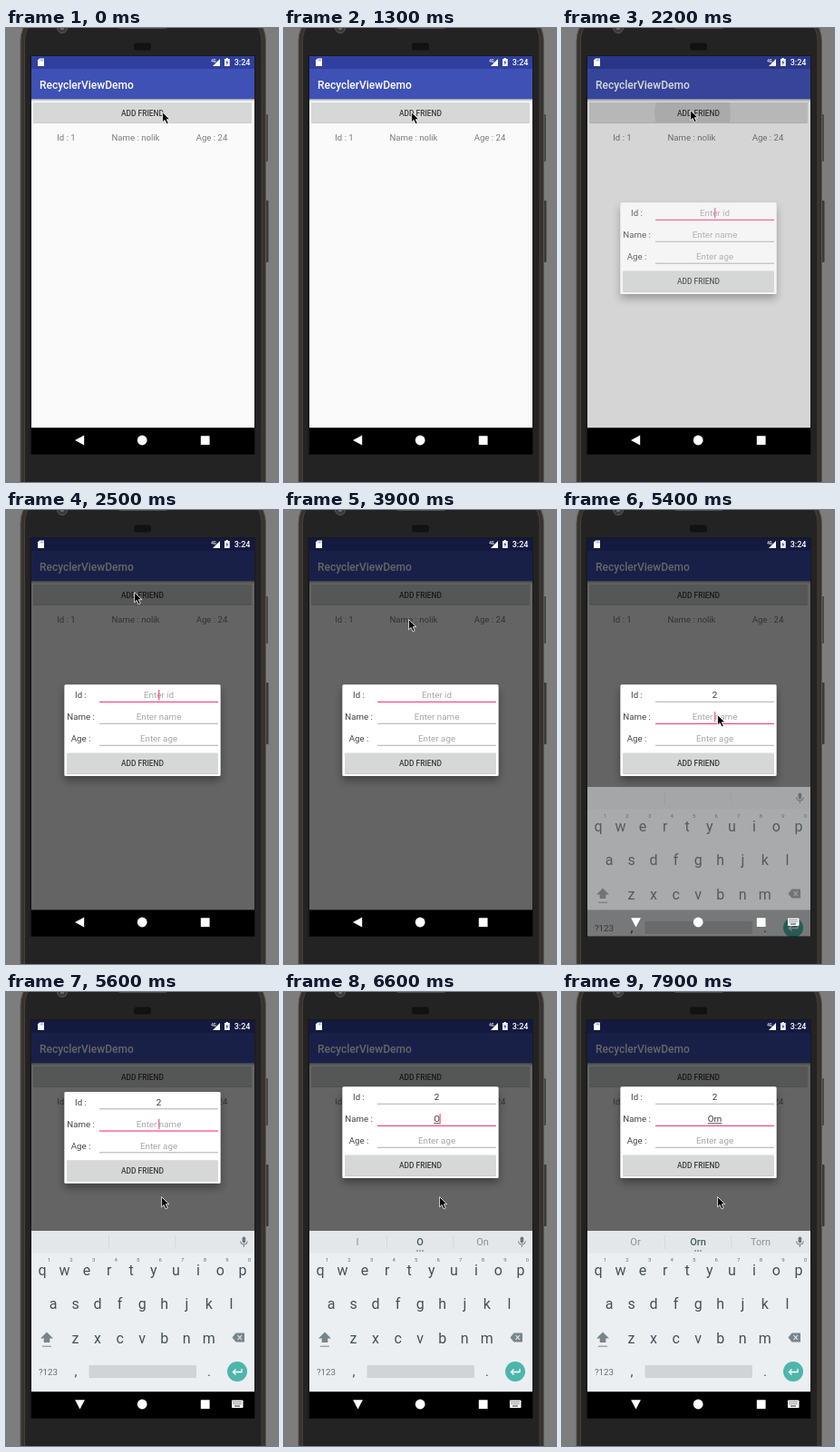
These frames come from a looping animation (300x500 px, 8000 ms). An HTML page:

```html
<!DOCTYPE html>
<html lang="en">
<head>
<meta charset="utf-8">
<title>RecyclerViewDemo</title>
<style>
  html, body { margin: 0; width: 100%; height: 100%; overflow: hidden; background: #7d7d7d; }
  svg { display: block; width: 300px; height: 500px; }
  text { font-family: Roboto, "Noto Sans", sans-serif; }
</style>
</head>
<body>
<svg id="stage" viewBox="0 0 300 500" text-anchor="middle" xmlns="http://www.w3.org/2000/svg"></svg>
<script>
const LOOP = 8000, STEP = 100;
const PRESS = 1900, OPEN = 2100, FOCUS_NAME = 5300, TYPE_ID = 4800;
const PINK = '#f8457f';

// time, x, y of the mouse pointer
const path = [
  [0, 172, 92], [800, 172, 92], [1000, 165, 120], [1100, 152, 136],
  [1300, 140, 92], [1500, 140, 92], [1600, 141, 90], [3700, 141, 90],
  [3900, 137, 120], [4300, 168, 205], [5000, 168, 205], [5300, 171, 225]
];

// typed name and the keyboard's suggestions
const typing = [
  { at: 0, name: '', words: ['', '', ''] },
  { at: 6500, name: 'O', words: ['I', 'O', 'On'] },
  { at: 6900, name: 'Or', words: ['Of', 'Or', 'Our'] },
  { at: 7200, name: 'Orn', words: ['Or', 'Orn', 'Torn'] }
];
const inputs = [OPEN, TYPE_ID, FOCUS_NAME, ...typing.slice(1).map(s => s.at)];

const attrs = o => Object.entries(o).map(([k, v]) => `${k}="${v}"`).join(' ');
const rect = (x, y, width, height, fill, more = {}) =>
  `<rect ${attrs({ x, y, width, height, fill, ...more })}/>`;
const circle = (cx, cy, r, fill, more = {}) =>
  `<circle ${attrs({ cx, cy, r, fill, ...more })}/>`;
const shape = (d, fill, more = {}) => `<path ${attrs({ d, fill, ...more })}/>`;
// y is the middle of the capital letters
const text = (s, x, y, size, fill, more = {}) =>
  `<text ${attrs({ x, y: y + size * 0.36, 'font-size': size, fill, ...more })}>${s}</text>`;
const bold = { 'font-weight': 500 };
const left = { 'text-anchor': 'start' };

function phone() {
  return rect(0, 0, 300, 500, '#7d7d7d') +
    rect(285, 95, 4, 52, '#4b4947', { rx: 1 }) +
    rect(285, 190, 4.5, 68, '#3c3a38', { rx: 1 }) +
    rect(16, -20, 270.5, 560, '#37332f', { rx: 34, stroke: '#5c5752' }) +
    rect(20.5, -16, 261.5, 552, '#242323', { rx: 30, stroke: '#45413d' }) +
    rect(26.5, 30, 248.5, 440, '#191919') +
    rect(124, -3, 54, 4, '#4a4a4a', { rx: 2 }) +
    circle(62, 0, 5.5, '#3a3a3b', { stroke: '#59595a' }) +
    circle(62, 0, 2.2, '#6b6b6d') +
    rect(141, 16.5, 19, 8, '#121212', { rx: 2.5 });
}

function app() {
  return rect(28, 31, 246, 409.5, '#fafafa') +
    rect(28, 78.4, 246, 3, 'url(#barShade)') +
    rect(28, 31, 246, 14, '#303f9f') +
    rect(28, 45, 246, 33.4, '#3f51b5') +
    text('RecyclerViewDemo', 37, 62.4, 12, '#fff', { ...bold, ...left }) +
    rect(30, 82.5, 241, 22.5, '#aaa', { rx: 1.2, opacity: .6 }) +
    rect(30, 82, 241, 22, '#d6d7d7', { rx: 1.2 }) +
    circle(144, 93, 0, '#000', { id: 'ripple', 'clip-path': 'url(#button)' }) +
    text('ADD FRIEND', 150.5, 93.6, 8.4, '#3c3c3c', bold) +
    text('Id : 1', 66.5, 120.3, 9.6, '#7d7d7d') +
    text('Name : nolik', 143, 120.3, 9.6, '#7d7d7d') +
    text('Age : 24', 227, 120.3, 9.6, '#7d7d7d');
}

function statusIcons() {
  return shape('M37 33.5H42V42H35V35.5Z', '#fff') +
    shape('M38 34.5V36.5M39.5 34.5V36.5M41 34.5V36.5', 'none', { stroke: '#303f9f', 'stroke-width': .5 }) +
    shape('M236 34V42H228Z', '#fff') +
    text('4G', 229, 36, 4.5, '#fff', bold) +
    shape('M242.7 34V33H244.7V34H246.7V42H241V34Z', '#fff') +
    shape('M244.4 35L242.4 38.4H243.7L243.2 41L245.4 37.4H244Z', '#303f9f') +
    text('3:24', 260.5, 38.2, 9, '#fff', bold);
}

function field(label, id, y) {
  return text(label, 82.5, y, 9.7, '#444') +
    text('', 168.5, y - .3, 9.8, '#333', { id }) +
    rect(103, y + 6.8, 131, .8, '#999', { id: id + 'Line' });
}

function dialog() {
  return rect(64.4, 192.3, 172.2, 100.7, '#fff', { rx: 1.5, filter: 'url(#shadow)' }) +
    field('Id :', 'idText', 204) +
    field('Name :', 'nameText', 228) +
    field('Age :', 'ageText', 252) +
    rect(0, 0, 0, .7, '#333', { id: 'composing' }) +
    rect(0, 0, 1.1, 11.5, PINK, { id: 'caret' }) +
    rect(67, 268, 167, 23, '#aaa', { rx: 1.2, opacity: .6 }) +
    rect(67, 267.5, 167, 22.5, '#d6d7d7', { rx: 1.2 }) +
    text('ADD FRIEND', 150.5, 278.9, 8.4, '#3c3c3c', bold);
}

function keyRow(chars, x, y) {
  return [...chars].map((c, i) => text(c, x + i * 24.55, y, 16, '#455058')).join('');
}

function keyboard() {
  const digits = [...'1234567890'].map((c, i) => text(c, 47.5 + i * 24.55, 295, 6, '#667078')).join('');
  const dots = [147, 150, 153].map(x => circle(x, 285, .8, '#455a64')).join('');
  return rect(28, 263, 246, 177, '#eceff1') +
    rect(28, 263, 246, 24.5, '#e4e7e9') +
    rect(113, 268, .7, 15, '#cfd4d7') + rect(186.5, 268, .7, 15, '#cfd4d7') +
    [81, 150, 219].map((x, i) =>
      text('', x, 275.5, 11, i == 1 ? '#455a64' : '#87949b', { id: 'word' + i, ...(i == 1 ? bold : {}) })).join('') +
    `<g id="dots">${dots}</g>` +
    rect(260.6, 269.5, 3.6, 7, '#6c777d', { rx: 1.8 }) +
    shape('M258.5 274.5a3.9 3.7 0 0 0 7.8 0M262.4 278.5V281', 'none', { stroke: '#6c777d', 'stroke-width': 1 }) +
    digits + keyRow('qwertyuiop', 40, 306) + keyRow('asdfghjkl', 52, 343) + keyRow('zxcvbnm', 76.5, 381) +
    shape('M45 374.5L52 381.5H48.3V386H41.7V381.5H38Z', '#78858c') +
    rect(40, 389.7, 10, 1, '#78858c') +
    shape('M249.5 380.5L253.5 375.5H263V385.5H253.5Z', '#78858c') +
    shape('M255.5 378L260 383M260 378L255.5 383', 'none', { stroke: '#eceff1', 'stroke-width': 1.1 }) +
    text('?123', 46.5, 418, 9.8, '#667078') +
    text(',', 77, 417.5, 15, '#455058') + text('.', 224, 417.5, 15, '#455058') +
    rect(91.5, 411, 118.5, 14, '#cfd4d8', { rx: 1 }) +
    circle(255, 418, 11, '#4db6ac') +
    shape('M260 415V418.5H250.5M253.5 415.5L250.3 418.5L253.5 421.5', 'none', { stroke: '#fff', 'stroke-width': 1.3 });
}

function keyboardIcon() {
  let holes = '';
  for (let x = 250.5; x < 260; x += 2) holes += `M${x} 451.5h1M${x} 453.7h1`;
  return rect(249, 449.5, 12.5, 8.5, '#fff', { rx: .8 }) +
    shape(holes + 'M252 456h6', 'none', { stroke: '#222', 'stroke-width': 1 });
}

const stage = document.getElementById('stage');
stage.innerHTML = `
  <defs>
    <linearGradient id="barShade" x2="0" y2="1">
      <stop stop-color="#000" stop-opacity=".25"/><stop offset="1" stop-color="#000" stop-opacity="0"/>
    </linearGradient>
    <filter id="shadow" x="-20%" y="-20%" width="140%" height="150%">
      <feDropShadow dx="0" dy="5" stdDeviation="5" flood-opacity=".36"/>
    </filter>
    <clipPath id="screen"><rect x="28" y="31" width="246" height="438.5"/></clipPath>
    <clipPath id="button"><rect x="30" y="82" width="241" height="22" rx="1.2"/></clipPath>
  </defs>
  ${phone()}
  <g clip-path="url(#screen)">
    ${app()}
    ${rect(28, 31, 246, 409.5, '#000', { id: 'dim' })}
    ${statusIcons()}
    <g id="dialog">${dialog()}</g>
    ${rect(28, 440.4, 246, 30, '#000')}
    <g id="keyboard">${keyboard()}</g>
    ${shape('M76 454L86.2 448.6V459.4Z', '#fff', { id: 'back' })}
    ${circle(150.2, 454, 5.4, '#fff')}
    ${rect(214.8, 449.3, 9.8, 9.6, '#fff', { rx: .5 })}
    <g id="switcher">${keyboardIcon()}</g>
  </g>
  ${shape('M.6 .6V11.8L3.2 9.4L5.1 13.8L7.2 12.9L5.3 8.7H8.8Z', '#000', { id: 'pointer', stroke: '#fff', 'stroke-width': .8 })}`;

const el = {};
stage.querySelectorAll('[id]').forEach(n => el[n.id] = n);
const set = (id, o) => { for (const k in o) el[id].setAttribute(k, o[k]); };
const show = (id, on) => set(id, { visibility: on ? 'visible' : 'hidden' });
const clamp = v => Math.max(0, Math.min(1, v));

function pointerAt(t) {
  const i = path.findIndex(p => p[0] > t);
  if (i < 0) return path[path.length - 1].slice(1);
  const [t0, x0, y0] = path[i - 1], [t1, x1, y1] = path[i];
  const k = (t - t0) / (t1 - t0);
  return [x0 + (x1 - x0) * k, y0 + (y1 - y0) * k];
}

function setField(id, value, hint, focused) {
  el[id].textContent = value || hint;
  set(id, { fill: value ? '#333' : '#a6a6a6' });
  set(id + 'Line', { fill: focused ? PINK : '#999', height: focused ? 1.2 : .8 });
}

function render(t) {
  const onName = t >= FOCUS_NAME;
  const state = typing.filter(s => s.at <= t).pop();
  const slide = 1 - (1 - clamp((t - 5400) / 300)) ** 2.5;

  set('ripple', { r: 42 * clamp((t - PRESS) / 300), opacity: .07 * clamp((2500 - t) / 300) });
  set('dim', { opacity: .6 * clamp((t - OPEN) / 400) });
  set('dialog', { opacity: clamp((t - OPEN) / 130), transform: `translate(0 ${-88 * slide})` });
  setField('idText', t >= TYPE_ID ? '2' : '', 'Enter id', !onName);
  setField('nameText', state.name, 'Enter name', onName);
  setField('ageText', '', 'Enter age', false);

  const typed = onName ? state.name : t >= TYPE_ID ? '2' : '';
  const half = typed ? el[onName ? 'nameText' : 'idText'].getComputedTextLength() / 2 : 0;
  const last = inputs.filter(at => at <= t).pop();
  set('caret', { x: 168.2 + half, y: onName ? 222 : 198 });
  show('caret', t >= OPEN && (t - last) % 1000 < 500);
  set('composing', { x: 168.5 - half, y: 232.2, width: onName ? 2 * half : 0 });

  const up = t >= 5400;
  const rise = clamp((t - 5400) / 200);
  show('keyboard', up);
  set('keyboard', { opacity: .5 + .5 * rise, transform: `translate(0 ${42 * (1 - rise) ** 2})` });
  state.words.forEach((w, i) => el['word' + i].textContent = w);
  show('dots', up && state.name);
  show('switcher', up);
  set('back', { transform: up ? 'rotate(-90 81.5 454)' : '' });

  set('pointer', { transform: `translate(${pointerAt(t)})` });
}

const start = performance.now();
function tick() {
  const t = (performance.now() - start) % LOOP;
  render(Math.floor(t / STEP) * STEP);
  requestAnimationFrame(tick);
}
tick();
</script>
</body>
</html>
```
